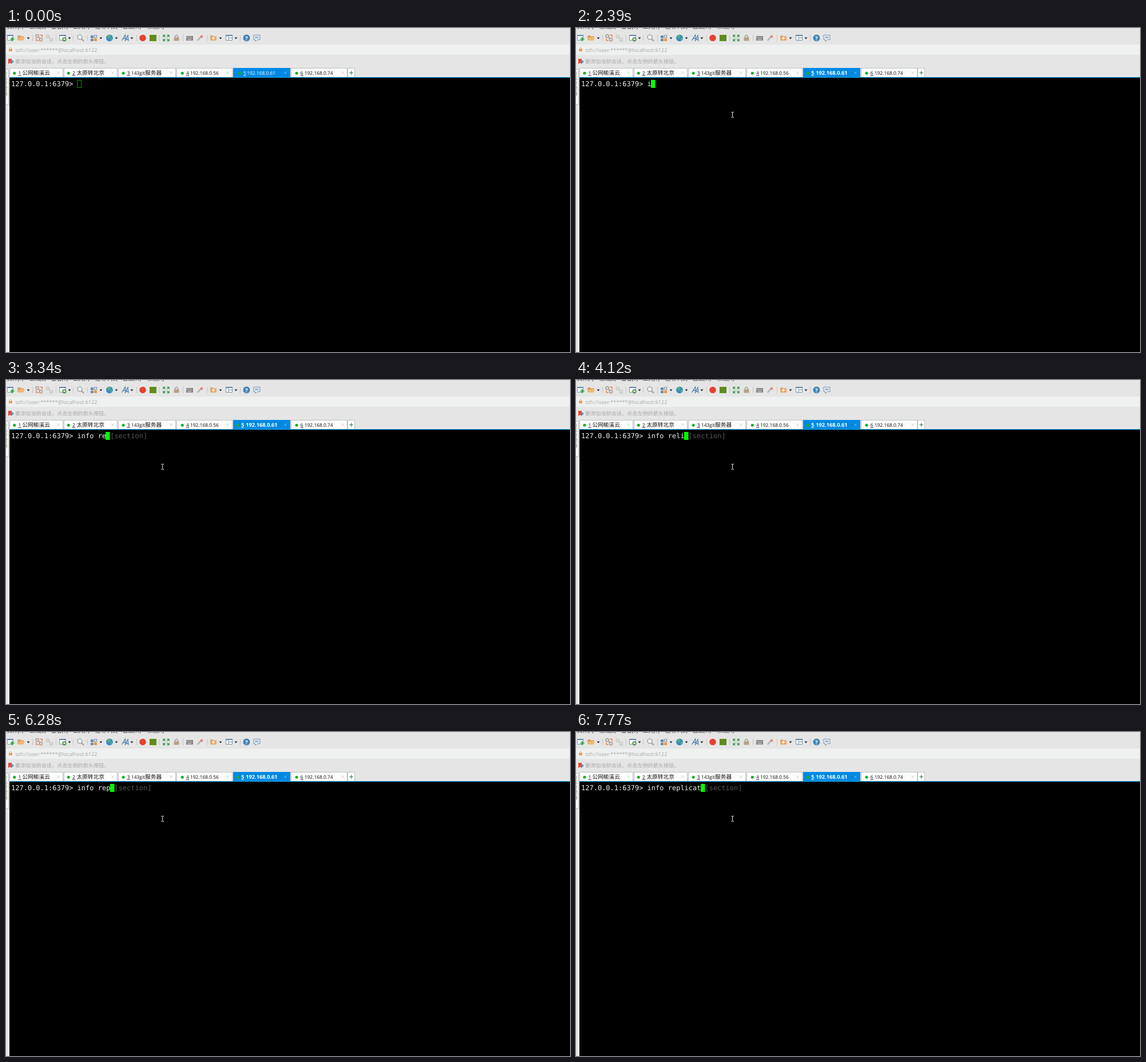
Write an HTML page that moves like this. It is 986 px wide and 568 px high and loops after 8000 ms.

```html
<!DOCTYPE html>
<html lang="zh">
<head>
<meta charset="utf-8">
<title>Terminal session</title>
<style>
  html, body { margin: 0; width: 100%; height: 100%; overflow: hidden; background: #000; }
  svg { display: block; width: 100vw; height: 100vh; text-rendering: geometricPrecision; }
  text { white-space: pre; font-family: "Open Sans", "Noto Sans CJK SC", "Noto Sans CJK", sans-serif; }
  .cjk { font-family: "Noto Sans CJK SC", "Noto Sans CJK", sans-serif; }
  .term text { font: 12px "DejaVu Sans Mono", monospace; }
</style>
</head>
<body>
<svg viewBox="0 0 986 568">
  <rect width="986" height="87" fill="#e5e5e5"/>
  <rect y="29" width="986" height="18" fill="#eff0f0"/>
  <rect y="87" width="6" height="481" fill="#e6e6e6"/>
  <g id="menu" class="cjk" font-size="9.2" fill="#222"></g>

  <g id="toolbar" fill="none">
    <!-- new window, folder -->
    <path d="M2.5 12.5h10v9h-10z" fill="#f7fafc" stroke="#7d9bb3"/>
    <path d="M2 13h11" stroke="#5a86a8" stroke-width="2"/>
    <path d="M11 16v7M7.500 19.500h7" stroke="#2fa84b" stroke-width="2.200"/>
    <path d="M20.500 22v-9h4l1.500 1.500h5v2" fill="#d99a55"/>
    <path d="M20.500 22l2.500-6h10l-2.500 6z" fill="#f0b878"/>
    <!-- connect, disconnect -->
    <g stroke-width="1.600">
      <g stroke="#a8a098"><circle cx="54.500" cy="14" r="2.500"/><circle cx="61" cy="20.500" r="2.500"/><path d="M56 16l4 3"/></g>
      <path d="M59 12.500h4v4M53 18v4h4" stroke="#e58a5a"/>
      <g stroke="#c5c5c5"><circle cx="73" cy="15" r="2.500"/><circle cx="79" cy="20.500" r="2.500"/><path d="M75 17l2 2"/></g>
    </g>
    <!-- properties, search -->
    <path d="M93.500 12.500h11v9h-11z" fill="#f3f6f8" stroke="#8199ad"/>
    <path d="M93 13h12" stroke="#6088a9" stroke-width="2"/>
    <circle cx="102" cy="20" r="2.700" stroke="#5d9b55" stroke-width="2"/>
    <circle cx="129" cy="16" r="4" fill="#f1f2f2" stroke="#a5a9ab" stroke-width="1.600"/>
    <path d="M132 19l4 4" stroke="#9a9a9a" stroke-width="2"/>
    <!-- arrange, globe, font -->
    <path d="M148 13h5v5h-5zM148 19h5v4h-5z" fill="#6c8ca8"/>
    <path d="M154.500 12.500h4v4h-4z" stroke="#728ca3"/>
    <path d="M154 18h5v5h-5z" fill="#e19a58"/>
    <circle cx="181" cy="17.500" r="6" fill="#3e8ac6"/>
    <path d="M177 14q3-4 6-1l-2 4-3 1zM182 19l4-2q0 4-3 5z" fill="#55b365"/>
    <path d="M202.500 22l6-10 1 10M205 18.500h4M208 23l5-10 1 10M210 20h4" stroke="#5484ad" stroke-width="1.300"/>
    <!-- companion tools -->
    <circle cx="239" cy="17.500" r="5.800" fill="#e0432f"/>
    <rect x="251" y="12" width="12" height="11" fill="#5f8c1b"/>
    <!-- full screen, lock -->
    <path d="M275 16v-3.500h3.500M281.500 12.500h3.500v3.500M285 19v3.500h-3.500M278.500 22.500h-3.500v-3.500M275.500 13l3 3M284.500 13l-3 3M284.500 22l-3-3M275.500 22l3-3" stroke="#3ca052" stroke-width="1.500"/>
    <path d="M295.500 17v-2q2.500-5 5 0v2" stroke="#999" stroke-width="1.500"/>
    <rect x="293.500" y="16.500" width="9" height="6" rx="1" fill="#b5a184"/>
    <!-- keyboard, highlighter -->
    <rect x="315" y="14" width="12" height="8" fill="#858585"/>
    <path d="M316 16h10M316 18h10" stroke="#ddd" stroke-dasharray="1 1"/>
    <path d="M318 20.500h6" stroke="#ddd"/>
    <path d="M335 22l6-7" stroke="#b3b3b3" stroke-width="2.500"/>
    <path d="M339 15l3-3 3 3-3 3z" fill="#e58578"/>
    <!-- transfer folder, layout -->
    <path d="M357 22v-9h4l1.500 1.500h5.500v7.500z" fill="#e4aa69"/>
    <path d="M362.500 15.500v5M360 18h5" stroke="#fff" stroke-width="1.500"/>
    <path d="M384.500 12.500h11v9h-11zM389 13v9M389 17.500h6" fill="#f8fafb" stroke="#7894aa"/>
    <path d="M384 13h12" stroke="#6088a9" stroke-width="2"/>
    <!-- help, feedback -->
    <circle cx="420.500" cy="17.500" r="6" fill="#4281b8"/>
    <text x="418" y="21.500" font-size="10" font-weight="bold" fill="#fff">?</text>
    <path d="M433 12.500h11v8h-5l-3 3v-3h-3z" fill="#f3f7fa" stroke="#688dab"/>
    <path d="M435 15.500h7M435 17.500h7" stroke="#688dab"/>
  </g>

  <!-- address and hint bars -->
  <path d="M6 37v-1q2-3 4 0v1" fill="none" stroke="#d9a068"/>
  <rect x="5" y="37" width="6" height="4" fill="#e7a15c"/>
  <text x="16" y="42" font-size="9.050" fill="#a5a5a5">ssh://user:******@localhost:6122</text>
  <path d="M4 54h6v9l-3-2-3 2z" fill="#dc4b3e"/>
  <path d="M9 55l5 4-5 4z" fill="#4f8fca"/>
  <text class="cjk" x="16" y="62" font-size="9.150" fill="#a9a9a9">要添加当前会话，点击左侧的箭头按钮。</text>

  <!-- side panel handle -->
  <path d="M-1 72.500h5.500v62h-5.500" fill="#fafafa" stroke="#bbb"/>
  <g id="side" class="cjk" font-size="8.500" fill="#71876f"></g>

  <g id="tabs"></g>
  <rect x="6" y="86" width="980" height="1.500" fill="#169bd7"/>
  <rect x="6" y="87.500" width="980" height="480.500"/>

  <g class="term">
    <rect id="cursor" y="91" height="14"/>
    <text id="typed" x="9" y="102" fill="#f0f0f0"></text>
    <text id="under" y="102" fill="#000"></text>
    <text id="hint" y="102" fill="#585858"></text>
  </g>
  <circle id="click" cx="272" cy="151.700" r="9" fill="#807900"/>
  <path id="pointer" d="M-2.500-4.500h2l.5.500.5-.5h2M0-4v8M-2.500 4.500h2l.5-.5.5.5h2" fill="none" stroke="#ddd"/>
</svg>
<script>
const $ = id => document.getElementById(id);
const label = (x, y, text, attrs = "") => `<text x="${x}" y="${y}" ${attrs}>${text}</text>`;

const menuItems = { 2: "文件(F)", 41: "编辑(E)", 79: "查看(V)", 117: "工具(T)", 156: "选项卡(B)", 204: "窗口(W)", 246: "帮助(H)" };
$("menu").innerHTML = Object.entries(menuItems).map(([x, s]) => label(x, 0.8, s)).join("");
$("side").innerHTML = [..."会话管理器"].map((c, i) => label(-6, 82 + i * 9, c)).join("");

$("toolbar").innerHTML +=
  [39, 111, 166, 193, 220, 375, 402].map(x => `<path d="M${x - 2.5} 16.5h5l-2.5 3z" fill="#222"/>`).join("") +
  [46.5, 87.5, 117.5, 142.5, 228.5, 268.5, 309.5, 351.5, 409.5]
    .map(x => `<path d="M${x} 12v11" stroke="#c6c6c6"/>`).join("");

// left edge, right edge, label start, name start, name
const tabs = [
  [6, 100, 21.5, 28.5, "公网榆溪云"],
  [101, 195, 116, 123.5, "太原转北京"],
  [196, 297, 211.8, 219, "143git服务器"],
  [298, 396, 315, 322, "192.168.0.56"],
  [397, 497, 415, 421.3, "192.168.0.61"],
  [498, 597, 514.7, 521.8, "192.168.0.74"],
];
const mixedName = name => name.replace(/[^\x00-\x7f]+/, s => `<tspan class="cjk" font-size="9.7">${s}</tspan>`);

function drawTabs(focused) {
  $("tabs").innerHTML = tabs.map(([left, right, x, nameX, name], i) => {
    const active = i === 4, bold = active && focused;
    const ink = active ? "#fff" : "#111";
    const style = `font-size="${bold ? 9.25 : 8.4}" font-weight="${bold ? 700 : 400}" fill="${ink}"`;
    const numX = bold ? 411.3 : x;
    return `<rect x="${left + .5}" y="70.5" width="${right - left - 1}" height="16"
        fill="${active ? "#0089e4" : "#fbfcfc"}" stroke="${active ? "#0089e4" : "#bfc3c5"}"/>
      <circle cx="${bold ? 405.5 : x - 6.7}" cy="79.300" r="2.500" fill="#12b020"/>` +
      label(numX, 82, i + 1, style) +
      `<path d="M${numX} 83.500h5" stroke="${ink}" stroke-width=".8"/>` +
      label(bold ? 419.2 : nameX, 82, mixedName(name), style) +
      `<path d="M${right - 10.5} 76.500l4 4m0-4l-4 4" stroke="${active ? "#8cc8f2" : "#c4c4c4"}" stroke-width=".9"/>`;
  }).join("") +
    `<rect x="597.500" y="70.500" width="12" height="16" fill="#fbfcfc" stroke="#bfc3c5"/>
     <path d="M600.500 78.500h6.500M603.700 75.300v6.500" stroke="#258a32" stroke-width="1.200"/>`;
}

const LOOP = 8000, FOCUS = 1140, CHAR = 7.215, PROMPT = "127.0.0.1:6379> ";
const typing = [
  [0, ""], [2390, "i"], [2560, "in"], [2710, "inf"], [2790, "info"], [2940, "info "],
  [3270, "info r"], [3340, "info re"], [3950, "info rel"], [4120, "info reli"],
  [5340, "info rel"], [5500, "info re"], [6280, "info rep"], [6430, "info repl"],
  [6830, "info repli"], [7060, "info replic"], [7220, "info replica"], [7770, "info replicat"],
];

function pointerAt(t) {
  if (t < 200) return [624.5, 340.5];
  const step = t < 510 ? 0 : Math.min(5, 1 + Math.floor((t - 510) / 77.5));
  const k = step / 5, ease = k * k * (3 - 2 * k);
  return [Math.floor(525 - 252 * ease) + .5, Math.round(291 - 139 * ease)];
}

function drawTerminal(input, focused) {
  const line = PROMPT + input, x = 9 + line.length * CHAR;
  const hint = !input.startsWith("info") ? "" : input.endsWith(" ") ? "[section]" : " [section]";
  $("typed").textContent = line;
  $("under").textContent = hint.slice(0, 1);
  $("under").setAttribute("x", x);
  $("hint").textContent = hint.slice(1);
  $("hint").setAttribute("x", x + CHAR);
  const box = focused
    ? { x: Math.floor(x), y: 91, width: 7.5, height: 14, fill: "#00ff00", stroke: "none" }
    : { x: 124.5, y: 91.5, width: 7, height: 13, fill: "none", stroke: "#009c00" };
  for (const key in box) $("cursor").setAttribute(key, box[key]);
}

let lastState;
function frame() {
  const t = performance.now() % LOOP, focused = t >= FOCUS;
  const input = typing.findLast(([start]) => t >= start)[1];
  const state = input + focused;
  if (state !== lastState) {
    drawTabs(focused);
    drawTerminal(input, focused);
    lastState = state;
  }
  $("pointer").setAttribute("visibility", t >= 120 ? "visible" : "hidden");
  $("pointer").setAttribute("transform", `translate(${pointerAt(t)})`);
  $("click").setAttribute("visibility", t >= 1070 && t < 1300 ? "visible" : "hidden");
  requestAnimationFrame(frame);
}
frame();
</script>
</body>
</html>
```
